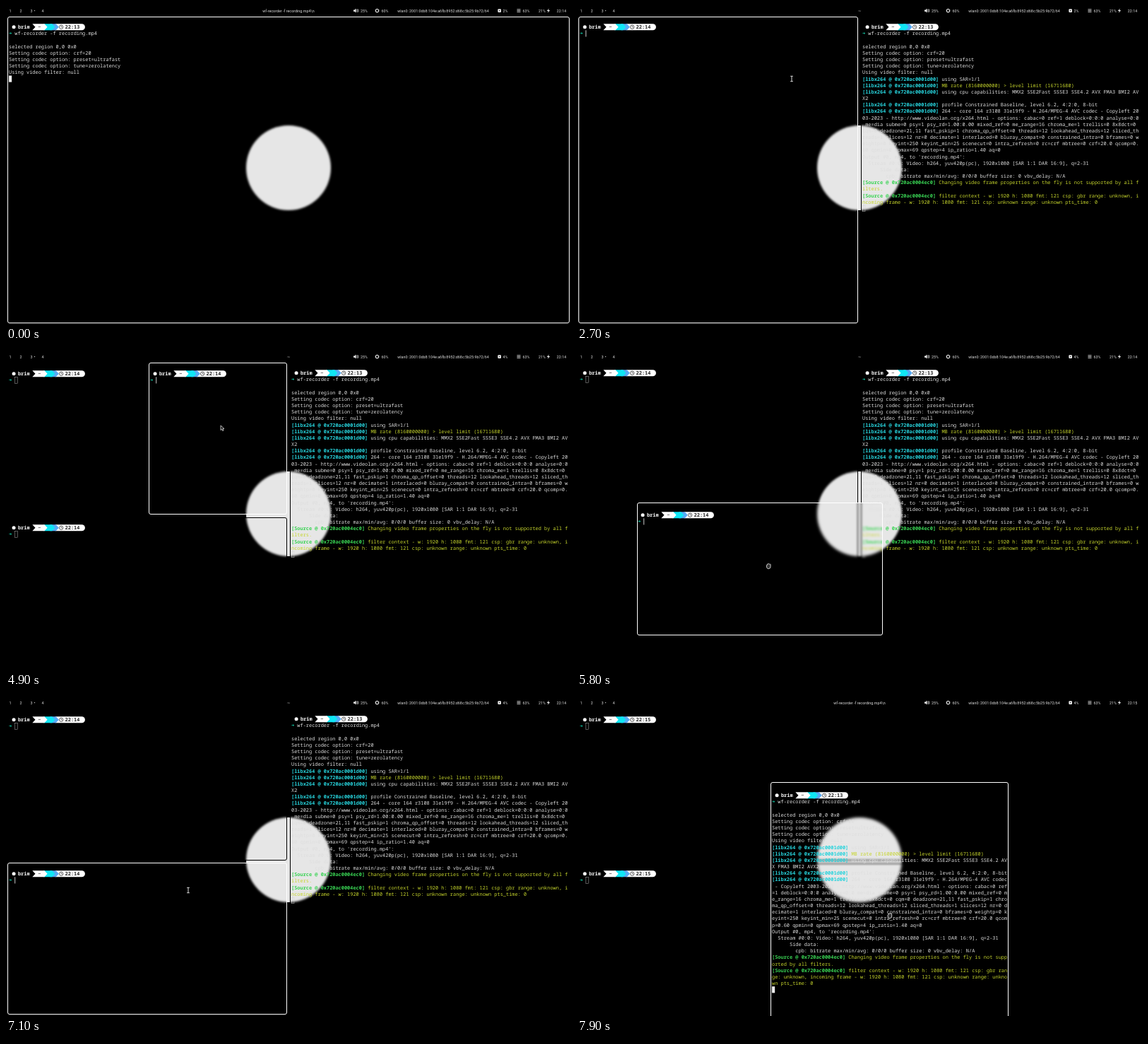
Recreate the animation shown at these times as an HTML page. Size 800x450 px, loop 8 s.

```html
<!DOCTYPE html>
<html lang="en">
<head>
<meta charset="utf-8">
<title>Tiling terminals</title>
<style>
  html, body { margin: 0; width: 100%; height: 100%; overflow: hidden; background: #000; }
  #stage { position: relative; width: 800px; height: 450px; overflow: hidden; background: #000; }
  #stage > svg { position: absolute; left: 0; top: 0; }
  #bar text { font: 5.4px Roboto, sans-serif; fill: #ddd; text-anchor: middle; }
  #pointer { z-index: 9; }
  .win { position: absolute; box-sizing: border-box; border: 1.25px solid #000; border-radius: 3px;
    overflow: hidden; backdrop-filter: blur(1.5px); }
  .win.active { border-color: #fff; }
  .term { position: absolute; transform: scale(.4166667); transform-origin: 0 0; white-space: pre;
    font: 500 16.667px/22px "Noto Sans Mono", "DejaVu Sans Mono", monospace; color: #dedede;
    text-rendering: geometricPrecision; }
  .term svg { position: absolute; left: 0; top: 22px; overflow: visible; }
  .term svg text { font-weight: 600; }
  .tag { color: #27d3dc; font-weight: 700; }
  .src { color: #39d353; font-weight: 700; }
  .warn { color: #c6d52c; }
  .arrow { color: #12dcb4; font-weight: 700; }
  .cur { display: inline-block; box-sizing: border-box; width: 10px; height: 22px; vertical-align: top; }
  .block { background: #eee; }
  .hollow { border: 1.6px solid #ccc; }
  .beam { border-left: 2.4px solid #eee; }
</style>
</head>
<body>
<div id="stage">
  <svg id="bar" width="800" height="450" viewBox="0 0 800 450">
    <circle cx="400" cy="229" r="60" fill="#e6e6e6"/>
    <text x="6" y="8.6">1</text><text x="21" y="8.6">2</text>
    <text x="36" y="8.6">3</text><circle cx="40.5" cy="6.6" r=".7" fill="#ddd"/><text x="52" y="8.6">4</text>
    <text id="title" x="400" y="8.6"></text>
    <path d="M492 5.4h1.6l2-1.8v6l-2-1.8H492z" fill="#eee"/>
    <path d="M496.6 5q1.3 1.6 0 3.2M497.8 4q2.2 2.6 0 5.2" fill="none" stroke="#eee" stroke-width=".8"/>
    <text x="507" y="8.6">25%</text>
    <circle cx="525.5" cy="6.6" r="2.1" fill="none" stroke="#ddd" stroke-width="1.1"/>
    <circle cx="525.5" cy="6.6" r="2.7" fill="none" stroke="#ddd" stroke-width=".6" stroke-dasharray="1 1.1"/>
    <text x="536.5" y="8.6">60%</text>
    <text x="619" y="8.6">wlan0: 2001:0db8:104e:a6fb:8952:d68c:5b25:9b72/64</text>
    <rect x="696.4" y="4.3" width="4.6" height="4.6" rx="1" fill="#eee"/><rect x="698" y="5.9" width="1.4" height="1.4" fill="#333"/>
    <text id="cpu" x="707" y="8.6"></text>
    <path d="M723.5 4.8h5M723.5 6.6h5M723.5 8.4h5" stroke="#ddd" stroke-width=".9"/>
    <text x="736.5" y="8.6">63%</text><text x="759" y="8.6">21%</text>
    <path d="M768.8 3.4l-3 3.6h2l-.8 2.8 3.2-3.8h-2z" fill="#eee"/>
    <text id="clock" x="786.5" y="8.6"></text>
  </svg>
  <svg id="pointer" width="800" height="450" viewBox="0 0 800 450">
    <g id="ibeam" fill="none"><path d="M-1.8-3.7H1.8M0-3.7V3.7M-1.8 3.7H1.8" stroke="#ddd"/></g>
    <path id="tip" d="M0 0v6.6l1.6-1.5 1.2 2.5 1.1-.5-1.1-2.5h2.2z" fill="#111" stroke="#ddd" stroke-width=".8"/>
    <path id="hand" d="M-3-.8q.3-1.2 1.3-.8v-1.2q.8-1 1.5 0 .8-.9 1.5.1.9-.6 1.4.5V1q0 2.5-2.3 2.7h-1.8Q-3 2.8-3-.8z" fill="#333" stroke="#ddd" stroke-width=".9"/>
  </svg>
</div>
<script>
const LOOP = 8000, STEP = 100, ANIM = 700;
const CELL_W = 10 / 2.4, CELL_H = 22 / 2.4, BORDER = 1.25;
const LOG_AT = 300, OPEN_A = 2000, OPEN_B = 3100, OPEN_C = 4000, CLOSE_C = 5100;
const GRAB_A = 5600, DROP_A = 6500, GRAB_REC = 7400;
const $ = id => document.getElementById(id);

// Rectangles are x, y, width, height
const FULL = [2, 14.5, 796, 434], LEFT = [2, 14.5, 396.4, 434], RIGHT = [402, 14.5, 396, 434];
const TOP = [2, 14.5, 396.4, 215.5], BOTTOM = [2, 233.5, 396.4, 215];
const TOP_L = [2, 14.5, 196, 215.5], TOP_R = [202, 14.5, 196.4, 215.5];
const WIDE_TOP = [2, 14.5, 796, 215.5], WIDE_BOTTOM = [2, 233.5, 796, 215];

const mousePath = [
  [0, 304, 103], [4000, 304, 103], [4300, 304, 104], [5200, 304, 104], [5600, 262, 320],
  [6200, 298, 254], [6500, 258, 272], [7100, 258, 272], [7400, 480, 284], [7900, 443, 308]
];
function mouse(t) {
  const i = mousePath.findIndex(k => k[0] > t);
  if (i < 0) return mousePath.at(-1).slice(1);
  const [t0, x0, y0] = mousePath[i - 1], [t1, x1, y1] = mousePath[i];
  const p = (t - t0) / (t1 - t0), e = p * p * (3 - 2 * p);
  return [x0 + (x1 - x0) * e, y0 + (y1 - y0) * e];
}
const held = (dx, dy, w, h) => t => {
  const [x, y] = mouse(t);
  return [x + dx, y + dy, w, h];
};

const tag = '[libx264 @ 0x720ac0001d00]', src = '[Source @ 0x720ac0004ec0]';
const intro = [
  ['arrow', '➜ '], ['', 'wf-recorder -f recording.mp4\n\nselected region 0,0 0x0\n' +
  ['crf=20', 'preset=ultrafast', 'tune=zerolatency'].map(o => `Setting codec option: ${o}\n`).join('') +
  'Using video filter: null\n']
];
const log = [
  ['tag', tag], ['', ' using SAR=1/1\n'],
  ['tag', tag], ['warn', ' MB rate (8160000000) > level limit (16711680)\n'],
  ['tag', tag], ['', ' using cpu capabilities: MMX2 SSE2Fast SSSE3 SSE4.2 AVX FMA3 BMI2 AVX2\n'],
  ['tag', tag], ['', ' profile Constrained Baseline, level 6.2, 4:2:0, 8-bit\n'],
  ['tag', tag], ['', ' 264 - core 164 r3108 31e19f9 - H.264/MPEG-4 AVC codec - Copyleft 2003-2023 - ' +
    'http://www.videolan.org/x264.html - options: cabac=0 ref=1 deblock=0:0:0 analyse=0:0 me=dia subme=0 ' +
    'psy=1 psy_rd=1.00:0.00 mixed_ref=0 me_range=16 chroma_me=1 trellis=0 8x8dct=0 cqm=0 deadzone=21,11 ' +
    'fast_pskip=1 chroma_qp_offset=0 threads=12 lookahead_threads=12 sliced_threads=1 slices=12 nr=0 ' +
    'decimate=1 interlaced=0 bluray_compat=0 constrained_intra=0 bframes=0 weightp=0 keyint=250 ' +
    'keyint_min=25 scenecut=0 intra_refresh=0 rc=crf mbtree=0 crf=20.0 qcomp=0.60 qpmin=0 qpmax=69 ' +
    'qpstep=4 ip_ratio=1.40 aq=0\n' +
    "Output #0, mp4, to 'recording.mp4':\n" +
    '  Stream #0:0: Video: h264, yuv420p(pc), 1920x1080 [SAR 1:1 DAR 16:9], q=2-31\n' +
    '      Side data:\n        cpb: bitrate max/min/avg: 0/0/0 buffer size: 0 vbv_delay: N/A\n'],
  ['src', src], ['warn', ' Changing video frame properties on the fly is not supported by all filters.\n'],
  ['src', src], ['warn', ' filter context - w: 1920 h: 1080 fmt: 121 csp: gbr range: unknown, ' +
    'incoming frame - w: 1920 h: 1080 fmt: 121 csp: unknown range: unknown pts_time: 0\n']
];
const shell = [['arrow', '➜ ']];

function wrap(parts, cols) {
  let col = 0;
  return parts.map(([kind, text]) => {
    let out = '';
    for (const c of text) {
      if (c === '\n') col = 0;
      else if (col++ === cols) { out += '\n'; col = 1; }
      out += c === '>' ? '&gt;' : c;
    }
    return `<span class="${kind}">${out}</span>`;
  }).join('');
}

const prompt = time => `<svg width="270" height="22">
  <circle cx="17" cy="11" r="6" fill="#fff"/><text x="31" y="17" fill="#fff">brim</text>
  <path d="M158 0H248a11 11 0 0 1 0 22H158z" fill="#fff"/>
  <path d="M140 0h20l10 11-10 11h-20z" fill="#58a9f5"/>
  <path d="M118 0h29l10 11-10 11h-29z" fill="#10e6f4"/>
  <path d="M80 0h41l10 11-10 11H80l10-11z" fill="#fff"/>
  <text x="99" y="17" fill="#333">~</text>
  <circle cx="178" cy="11" r="6.5" fill="none" stroke="#222" stroke-width="1.7"/>
  <path d="M178 7v4.5h3.5" fill="none" stroke="#222" stroke-width="1.5"/>
  <text x="191" y="17" fill="#222">${time}</text></svg>`;

const shellTime = t => t < GRAB_REC ? '22:14' : '22:15';
const windows = [
  { name: 'rec', keys: [[0, FULL], [OPEN_A, RIGHT], [GRAB_REC, held(-169, -188.5, 336.5, 376)]],
    time: () => '22:13', parts: t => t < LOG_AT ? intro : [...intro, ...log], cursor: 'block' },
  { name: 'a', keys: [[OPEN_A, LEFT], [OPEN_B, BOTTOM], [GRAB_A, held(-167.5, -94.5, 336.5, 182)],
    [DROP_A, BOTTOM], [GRAB_REC, WIDE_BOTTOM]] },
  { name: 'b', keys: [[OPEN_B, TOP], [OPEN_C, TOP_L], [CLOSE_C, TOP], [GRAB_A, LEFT], [DROP_A, TOP], [GRAB_REC, WIDE_TOP]] },
  { name: 'c', keys: [[OPEN_C, TOP_R]], close: CLOSE_C }
].map(w => {
  const box = document.createElement('div'), term = document.createElement('div');
  term.className = 'term';
  box.append(term);
  $('stage').insertBefore(box, $('pointer'));
  return { time: shellTime, parts: () => shell, cursor: 'beam', ...w, box, term };
});

const ease = p => 1 - (1 - Math.min(1, Math.max(0, p))) ** 5;
const mix = (a, b, e) => a.map((v, i) => v + (b[i] - v) * e);
const shrink = ([x, y, w, h], s) => [x + w * (1 - s) / 2, y + h * (1 - s) / 2, w * s, h * s];
const resolve = (target, t) => typeof target === 'function' ? target(t) : target;

function focused(t) {
  const order = [[GRAB_REC, 'rec'], [CLOSE_C, 'a'], [OPEN_C, 'c'], [OPEN_B, 'b'], [OPEN_A, 'a'], [0, 'rec']];
  return order.find(([start]) => t >= start)[1];
}

function drawWindow(win, t, active) {
  const { keys, box, term } = win;
  const i = keys.findLastIndex(k => t >= k[0]);
  const closing = win.close && t >= win.close ? (t - win.close) / 500 : 0;
  box.style.display = i < 0 || closing >= 1 ? 'none' : '';
  if (i < 0 || closing >= 1) return;

  const [start, target] = keys[i], goal = resolve(target, t);
  const from = i ? resolve(keys[i - 1][1], start) : start ? shrink(goal, 0.05) : goal;
  let rect = mix(from, goal, ease((t - start) / ANIM));
  if (closing) rect = shrink(rect, 1 - 0.2 * ease(closing));
  ['left', 'top', 'width', 'height'].forEach((side, n) => box.style[side] = rect[n] + 'px');
  box.style.opacity = closing ? 1 - closing : i || !start ? 1 : Math.min(1, (t - start + STEP) / 300);
  box.style.zIndex = typeof target === 'function' ? 2 : 1;
  box.className = active ? 'win active' : 'win';

  // Leftover space around the character grid is shared evenly
  const w = goal[2] - 2 * BORDER, h = goal[3] - 2 * BORDER;
  term.style.left = (w % CELL_W) / 2 + 'px';
  term.style.top = (h % CELL_H) / 2 + 'px';
  const cursor = active ? win.cursor : 'hollow';
  const html = prompt(win.time(t)) + '\n\n' + wrap(win.parts(t), Math.floor(w / CELL_W)) +
    `<span class="cur ${cursor}"></span>`;
  if (win.html !== html) term.innerHTML = win.html = html;
}

function drawPointer(t) {
  const dragging = t >= GRAB_A && t < DROP_A || t >= GRAB_REC;
  const shape = t < OPEN_A + 200 ? '' : dragging ? 'hand' : t >= OPEN_C && t < CLOSE_C ? 'tip' : 'ibeam';
  const [x, y] = mouse(t);
  for (const id of ['ibeam', 'tip', 'hand']) {
    $(id).style.display = id === shape ? '' : 'none';
    $(id).setAttribute('transform', `translate(${x} ${y})`);
  }
}

function draw(t) {
  const active = focused(t);
  windows.forEach(w => drawWindow(w, t, w.name === active));
  drawPointer(t);
  $('title').textContent = active === 'rec' ? 'wf-recorder -f recording.mp4\\n' : '~';
  $('cpu').textContent = t < 3800 ? '2%' : '4%';
  $('clock').textContent = shellTime(t);
}

const origin = performance.now();
function tick() {
  const t = (performance.now() - origin) % LOOP;
  draw(Math.floor(t / STEP) * STEP);
  requestAnimationFrame(tick);
}
tick();
</script>
</body>
</html>
```
